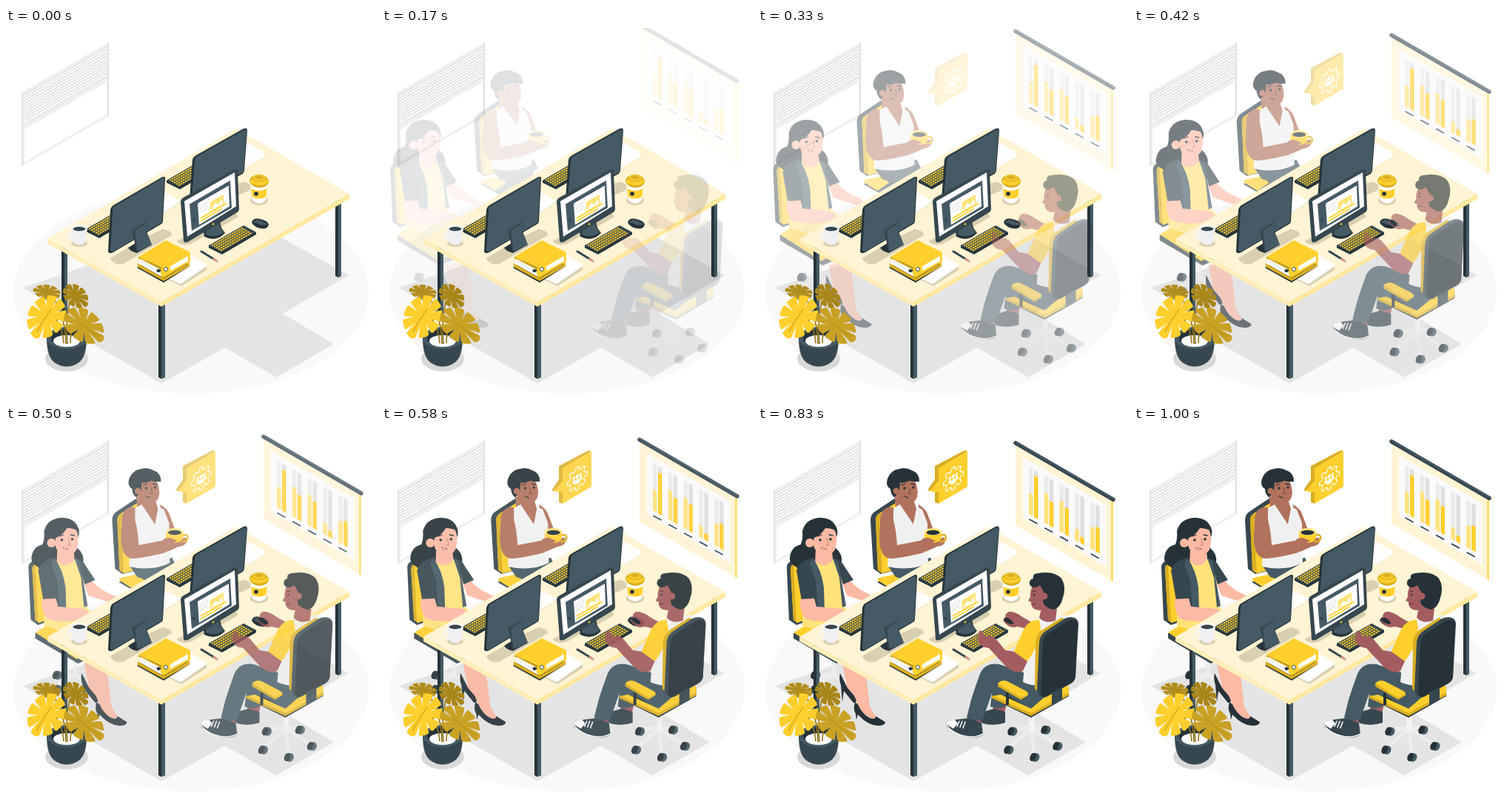
An HTML page for the animation above (1040 ms loop, 500 by 500 pixels).

```html
<!DOCTYPE html>
<html lang="en">
<head>
<meta charset="utf-8">
<title>Office team</title>
<style>
html, body { margin: 0; height: 100%; overflow: hidden; background: #fff }
svg { display: block; width: 100vw; height: 100vh; fill: none }
.y { fill: #ffcf2d } .yd { fill: #d9ae22 } .yl { fill: #ffe27a } .yp { fill: #fff4d4 }
.k { fill: #263238 } .d { fill: #37474f } .m { fill: #455a64 }
.w { fill: #fff } .g { fill: #f0f0f0 } .s { fill: #e4e4e4 } .t { fill: #d9cfb1 }
.a { fill: #b0725c } .b { fill: #fcb9a4 } .c { fill: #a35d60 }
.ln { stroke-linecap: round; stroke-linejoin: round }
</style>
</head>
<body>
<svg viewBox="0 0 500 500">
<defs>
  <g id="keyboard">
    <path class="k" d="M274 294L321 267L338 276V279L292 306L274 297Z"/>
    <path class="d" d="M274 294L321 267L338 276L291 303Z"/>
    <g id="keys"></g>
  </g>
  <g id="caster">
    <ellipse class="m" cx="2" cy="-1" rx="5" ry="6" transform="rotate(25)"/>
    <ellipse class="k" cx="-1.500" rx="4" ry="6" transform="rotate(25)"/>
  </g>
</defs>

<!-- floor and window -->
<ellipse cx="250" cy="356" rx="240" ry="138" fill="#f9f9f9"/>
<path class="s" d="M23 351L70 379L100 417L210 480L296 432L365 472L443 427L374 386L463 334L313 250Z"/>
<path class="g" d="M21 87L139 19V119L21 187Z"/>
<path d="M22 87V186M138 20V119" stroke="#dedede" stroke-width="1.500"/>
<path class="w" d="M25 89L136 25V64L25 128ZM25 137L136 73V117L25 181Z"/>
<g id="blinds"></g>
<path d="M25 130L136 66" stroke="#e6e6e6" stroke-width="2"/>

<!-- chart board -->
<g id="board">
  <path class="yp" d="M348 24L479 100V208L348 132Z"/>
  <path class="y" d="M477.500 99L479.500 100V208L477.500 207Z"/>
  <path fill="#fafafa" d="M358 40L471 105V188L358 122Z"/>
  <g id="bars"></g>
  <path class="ln" d="M348 21L480 97.500" stroke="#37474f" stroke-width="5.500"/>
  <path class="ln" d="M348 19.500L480 96" stroke="#455a64" stroke-width="2"/>
</g>

<!-- speech bubble -->
<g id="bubble">
  <path class="yd" d="M239 54L279 33L283 34L244 58V105L239 103V89L229 87L239 72Z"/>
  <path class="y" d="M244 57L283 34V82L244 105V90L232 88L244 74Z"/>
  <g transform="matrix(.866 -.5 0 1 264 71)">
    <path id="gear" stroke="#fff" stroke-width="1.300"/>
    <g class="w">
      <path d="M-4 7V3Q0-2 4 3V7ZM-8 4V1Q-5-2-3 1L-5 4ZM8 4V1Q5-2 3 1L5 4Z"/>
      <circle cy="-3" r="2.500"/><circle cx="-5" cy="-3" r="2"/><circle cx="5" cy="-3" r="2"/>
    </g>
  </g>
</g>

<!-- left team -->
<g id="left">
  <!-- coffee drinker -->
  <path class="d" d="M150 127Q150 119 157 115L181 99Q190 95 195 103L205 190L164 200L154 193Z"/>
  <path class="y" d="M157 127Q157 121 162 118L184 104Q192 101 195 108L202 190L166 199L160 195Z"/>
  <path class="yd" d="M157 127Q157 121 162 118L166 120Q162 124 162 130L166 199L160 195Z"/>
  <path class="d" d="M159 211L188 198L230 190V215L185 226Z"/>
  <path class="y" d="M159 208Q160 205 166 204L182 201Q190 205 194 209L178 220Z"/>
  <path class="m" d="M173 188L231 178L237 190L200 209L184 204Z"/>
  <path class="a" d="M215 106Q226 112 229 124L238 148L228 160L216 130Z"/>
  <path class="a" d="M183 96L206 92L212 112L207 138L184 116Z"/>
  <path class="g" d="M176 114Q184 109 190 106L208 133L213 109L220 113L227 131L228 185Q204 197 173 190Z"/>
  <path class="a" d="M181 110Q164 108 163 127L162 153Q163 178 177 179Q190 179 222 171L229 161L222 154L186 161Q185 142 181 127Z"/>
  <path class="a" d="M217 157Q222 148 230 152L245 152Q251 148 251 156Q249 162 240 163L224 170Z"/>
  <path d="M244 148Q253 145 252 152Q250 157 243 156" stroke="#d9ae22" stroke-width="2.500"/>
  <path class="y" d="M223 143V151Q226 158 235 158Q244 157 246 151V143Z"/>
  <ellipse class="yl" cx="234.500" cy="143" rx="11.500" ry="5"/>
  <ellipse class="k" cx="234.500" cy="144" rx="9" ry="3.200"/>
  <path class="a" d="M221 157Q222 150 228 151L238 155L229 161Z"/>
  <path class="a" d="M182 76Q195 66 210 74Q217 90 211 100Q204 107 193 102Q184 97 182 89Z"/>
  <path class="k" d="M183 97Q177 92 177 85Q169 80 174 69Q179 59 189 58Q198 55 206 60Q216 63 216 75Q209 76 203 74Q193 78 190 76L189 88Q187 82 183 84Q181 87 186 91Z"/>
  <circle class="a" cx="184.500" cy="88" r="4"/>
  <g class="ln" stroke="#263238" stroke-width="1.300"><path d="M192 80L197 78M205 78L210 79M196 95L201 97"/><path d="M203 84L204 91L201 91" stroke="#85503f"/></g>
  <circle class="k" cx="196" cy="84" r="1.700"/><circle class="k" cx="208" cy="83" r="1.700"/>

  <!-- woman in a jacket -->
  <path class="d" d="M37 193Q36 186 42 183L58 177L75 260L50 269L40 262Z"/>
  <path class="y" d="M42 194Q42 188 47 186L60 182L74 258L51 266L46 262Z"/>
  <path class="yd" d="M42 194Q42 188 46 187L50 265L46 262Z"/>
  <path d="M100 318V336L78 338M100 336L75 351M100 336L120 350" stroke="#ededed" stroke-width="5"/>
  <use href="#caster" x="75" y="337"/><use href="#caster" x="75" y="356"/>
  <path class="d" d="M46 280L73 270L140 305L104 321L46 287Z"/>
  <path class="y" d="M46 279L65 268L130 300L102 315Z"/>
  <path class="yl" d="M58 252L112 243L148 270L90 280L58 270Z"/>
  <path class="b" d="M112 320L119 356L127 371L132 367L127 345L129 320Z"/>
  <path class="k" d="M109 334Q107 342 110 350L112 373L114 358L127 374Q132 374 131 368L119 354L112 340Z"/>
  <path class="b" d="M117 318Q116 337 128 364L135 382Q148 398 159 396L149 379L145 345L141 318Z"/>
  <path class="k" d="M129 373Q126 382 130 389L131 397L133 390Q147 405 160 405Q170 405 170 400L157 392Q157 398 148 394Q138 388 133 376Z"/>
  <path class="k" d="M58 142Q62 126 80 124Q100 123 105 140Q106 146 104 150L102 164Q113 173 111 185Q90 194 70 189Q57 199 49 190Q37 185 43 170Q47 162 56 160Q59 152 58 142Z"/>
  <path class="b" d="M76 167L98 170L100 185L86 195L75 186Z"/>
  <path class="yl" d="M69 187L77 184Q88 194 100 180L108 186L116 245L64 260Z"/>
  <path class="b" d="M110 208L121 207Q132 222 157 231V242L118 229Z"/>
  <path class="d" d="M100 178Q111 181 115 190L127 208L113 214L108 198Z"/>
  <path class="m" d="M99 178L106 183L117 243L112 245L108 205Z"/>
  <path class="d" d="M72 178Q55 181 50 195L57 236L74 235L77 250L86 249L83 212Z"/>
  <path class="m" d="M72 178Q84 195 87 218L88 249L79 250L76 210L68 186Z"/>
  <path class="b" d="M55 234L74 233L77 244L112 247L125 256L105 263Q70 266 61 259Q54 249 55 234Z"/>
  <path class="b" d="M73 146Q83 132 101 139Q107 151 102 167Q96 177 86 174Q75 171 73 161Z"/>
  <path class="k" d="M71 163Q65 142 78 133Q92 127 104 142Q98 138 89 138Q82 149 74 151Z"/>
  <circle class="b" cx="68" cy="158" r="6"/>
  <g class="ln" stroke="#263238" stroke-width="1.300"><path d="M79 149L84 147M94 147L99 148"/><path d="M91 152L93 161L90 161" stroke="#d98b7b"/></g>
  <circle class="k" cx="82" cy="154" r="1.800"/><circle class="k" cx="96" cy="153" r="1.800"/>
  <path class="w" d="M83 164L91 166Q86 169 83 164Z" stroke="#9b4d4d" stroke-width=".8"/>
</g>

<!-- table -->
<g>
  <path class="k" d="M75 294H83V394L75 390ZM206 370H215V472L210 474L206 472ZM445 232H453V335L449 337L445 335Z"/>
  <path class="m" d="M79 294H83V394H79ZM210 370H215V472L210 474ZM449 232H453V335L449 337Z"/>
  <path class="yp" d="M56 285L311 136L464 224L210 370Z"/>
  <path d="M56 285L210 370V376.500L56 291Z" fill="#ffeeb8"/>
  <path d="M210 370L464 224V231L210 376.500Z" fill="#ffe8a0"/>
</g>

<!-- desk items -->
<path class="w" d="M319 151L349 168L323 184L300 172ZM205 217L236 234L210 251Z"/>
<path d="M349 168V174L323 189M236 235L211 252" stroke="#e5e0d0"/>
<path class="w" d="M349 169V174L323 189V184Z"/>
<use href="#keyboard" x="-57" y="-88"/>
<use href="#keyboard" x="-166" y="-22"/>
<path class="t" d="M300 212L322 208Q333 211 330 219L314 226L290 224Z"/>
<path class="k" d="M248 232L252 178Q253 174 257 172L321 136Q326 134 326 139L322 192Q322 196 318 198L254 232Q249 235 248 232Z"/>
<path class="m" d="M251 230L255 179Q255 175 259 173L321 138Q325 136 325 140L321 192Q321 195 317 197L255 230Z"/>
<path class="t" d="M141 311L192 281L211 272Q225 274 224 280L158 319Q145 321 141 311Z"/>
<path class="k" d="M138 302L141 246Q142 241 146 239L210 202Q216 199 215 205L212 261Q212 264 208 266L145 303Q139 306 138 302Z"/>
<path class="m" d="M141 302L144 246Q144 242 148 240L211 203Q214 202 214 206L211 260Q211 263 207 265L145 302Z"/>
<path class="k" d="M165 297L176 290L197 293L177 304Q168 302 165 297Z"/>
<path class="d" d="M170 273L189 262L190 275L197 293L177 303Z"/>
<path class="m" d="M174 274L189 264L190 275L197 293L178 301Z"/>

<path class="t" d="M231 288L300 247Q315 251 313 256L251 291Q236 296 231 288Z"/>
<path class="k" d="M267 274L289 262L291 270L296 277Q284 290 268 282Z"/>
<path class="m" d="M270 274L288 264L290 271L295 276Q282 285 270 279Z"/>
<path class="d" d="M236 235Q236 231 240 229L309 191Q313 190 313 194L315 244Q315 248 311 250L246 289Q240 291 240 287Z"/>
<path class="w" d="M241 234L309 195L311 241L245 282Z"/>
<path class="m" d="M248 238L303 206L305 243L251 274Z"/>
<path class="w" d="M259 237L301 213L302 241L261 266Z"/>
<path class="yl" d="M276 235L294 225V238L276 248Z"/>
<path class="w" d="M277 246L283 236L287 239L291 231L293 238Z"/>
<path d="M262 241L273 235M262 245L273 239M262 249L273 243" stroke="#dedede"/>
<path d="M263 257L298 237M263 261L292 244" stroke="#ffcf2d" stroke-width="2"/>
<circle class="k" cx="254" cy="260" r="1.500"/><circle class="y" cx="280" cy="265" r="1.300"/>

<use href="#keyboard"/>
<path class="k" d="M332 263Q334 256 343 258Q353 260 355 265Q354 272 346 271Q336 270 332 263Z"/>
<path class="m" d="M334 262Q338 257 344 260L354 265Q347 269 334 262Z"/>
<path class="ln" d="M264 302L282 313" stroke="#37474f" stroke-width="3"/>
<path class="ln" d="M281 312L285 315" stroke="#d99a8c" stroke-width="3"/>

<ellipse class="t" cx="99" cy="291" rx="11" ry="5"/>
<path d="M91 277Q84 275 85 282Q87 287 92 286" stroke="#f5f5f5" stroke-width="3"/>
<path class="g" d="M88 271L90 288Q93 293 99 293Q106 293 108 288L110 271Z"/>
<ellipse class="w" cx="99" cy="271" rx="11" ry="5"/><ellipse class="d" cx="99" cy="271.500" rx="8.500" ry="3"/>

<ellipse class="t" cx="342" cy="233" rx="12" ry="6.500"/>
<path class="w" d="M331 212L333 233Q342 241 351 233L353 212Z"/>
<path class="y" d="M331.500 217Q342 223 352.500 217L351.500 228Q342 233 332.500 228Z"/>
<circle class="k" cx="338" cy="224" r="2.800"/>
<path class="yd" d="M329 207Q329 202 333 201Q342 196 351 201Q355 203 355 208Q354 215 342 216Q331 215 329 207Z"/>
<ellipse class="y" cx="342" cy="207" rx="12" ry="5.500"/><ellipse class="yd" cx="342" cy="203" rx="10" ry="5"/><ellipse class="y" cx="342" cy="202.500" rx="8.500" ry="4"/><ellipse class="yd" cx="342" cy="202" rx="6" ry="2.500"/>

<path class="t" d="M215 338L237 349L272 326L268 321Z"/>
<path class="w" d="M214 336L246 304L272 321L236 346Z"/>
<path d="M214 337L236 347L272 322" stroke="#ded8c6"/>
<path class="k" d="M177 324L213 344L248 322L243 315L190 315Z"/>
<path class="yd" d="M178 318L213 338L248 317V322L213 342L178 323Z"/>
<path class="w" d="M182 314L210 330V336L182 320Z"/>
<path class="y" d="M179 309L216 287L249 303L212 325Z"/>
<path class="yd" d="M179 309L211 325V328L179 312Z"/>
<path class="w" d="M181 312L208 326V333L181 318Z"/>
<path d="M181 315L208 330" stroke="#dedede"/>
<path class="y" d="M210 325L249 303V316L212 338Q207 332 210 325Z"/>
<path class="w" d="M222 322L246 308V315L222 328Z"/>
<circle class="w" cx="216" cy="326" r="2.500" stroke="#37474f"/><circle class="k" cx="206" cy="328" r="2.300"/>

<!-- plant -->
<ellipse cx="82" cy="447" rx="29" ry="17" fill="#d8d8d8"/>
<path class="d" d="M55 419Q55 446 67 453Q82 462 97 453Q109 446 109 419Z"/>
<ellipse class="m" cx="82" cy="419" rx="27" ry="15"/><ellipse class="k" cx="82" cy="419" rx="21" ry="12"/><ellipse class="w" cx="82" cy="423" rx="18" ry="8"/>
<g id="plant"><path d="M81 427Q80 390 65 366M83 427Q80 390 87 368M78 426Q76 398 60 386M87 426Q87 405 98 397" stroke="#8f7219" stroke-width="1.600"/></g>

<!-- man at the front -->
<g id="right">
  <g id="base">
    <path class="ln" d="M372 406L347 412M372 406L391 410M372 409L342 434M372 409L375 444M372 409L404 430" stroke="#ededed" stroke-width="5"/>
    <path d="M372 388V412" stroke="#f4f4f4" stroke-width="7"/>
  </g>
  <path class="c" d="M370 275L352 271Q342 275 333 263L340 251Q351 251 359 258L375 267Z"/>
  <path class="k" d="M334 261Q337 257 346 261L347 268Q337 268 334 261Z"/>
  <path class="c" d="M336 256Q339 249 348 252L360 259L353 270L345 263Z"/>
  <path class="y" d="M330 358L380 335L422 352V363L371 391L318 366Z"/>
  <path class="c" d="M320 376L338 376L335 388L319 390Z"/>
  <path class="d" d="M286 388Q292 383 300 388L321 382L336 386V401Q321 406 306 402Z"/>
  <path class="m" d="M350 330Q322 328 320 344L316 379Q327 385 338 377L341 362L370 370Z"/>
  <path class="c" d="M287 390L304 391L303 403L285 402Z"/>
  <path class="m" d="M375 338L328 322Q309 319 302 335Q295 354 290 370L284 394Q294 402 306 396L318 361Q328 364 344 372L371 382L392 364Z"/>
  <path class="d" d="M256 403Q258 396 268 397L285 395L304 401L306 417Q299 423 282 420Q268 416 257 407Z"/>
  <path class="w" d="M256 403Q258 396 268 397L272 402L266 409Z"/>
  <path d="M256 404Q266 416 281 419Q296 422 306 416" stroke="#fff" stroke-width="1.500"/>
  <path class="ln" d="M271 406L274 399M275 407L278 399M279 408L282 400" stroke="#fff" stroke-width="1.500"/>
  <path class="k" d="M322 364L342 366L371 384L422 356V365L371 394L318 368Z"/>
  <path class="y" d="M318 365L330 363L371 382L422 354V362L371 390Z"/>
  <path class="yd" d="M318 364L371 388L422 360V364L371 392L318 368Z"/>
  <path class="g" d="M378 263Q401 253 420 256L416 340Q385 358 360 346L365 290Z"/>
  <path class="c" d="M387 237L406 247L404 263Q390 268 382 259Z"/>
  <path class="y" d="M382 262Q367 262 360 277L346 309L365 319Q378 303 385 280Z"/>
  <path class="c" d="M348 305L336 303L322 286L311 297L338 326Q351 336 360 331L366 318Z"/>
  <path class="c" d="M300 281Q300 275 304 277L309 284L319 284L325 291L313 300Q299 298 299 286Z"/>
  <path class="c" d="M373 216Q369 225 370 231L367 236L371 238Q371 249 383 249L398 244L400 220L388 211Z"/>
  <path class="k" d="M388 241Q386 231 389 226L383 215Q373 222 369 214Q368 207 374 206Q372 200 380 199Q402 195 412 206Q419 217 414 232Q411 245 402 248Q395 248 388 241Z"/>
  <circle class="c" cx="389" cy="230" r="4.500"/>
  <path class="ln" d="M373 224L377 223M372 241L377 240" stroke="#4f2c30"/><circle class="k" cx="375" cy="228" r="1.300"/>
  <path class="yd" d="M376 355L377 293Q378 281 387 275L412 259L418 262L386 365Z"/>
  <path class="d" d="M379 358L382 292Q383 282 391 277L415 261Q422 257 429 259Q435 261 435 268L431 338Q431 344 425 348L392 366Q383 369 379 358Z"/>
  <path class="k" d="M384 360L387 294Q387 285 395 280L420 264Q434 257 434 269L431 338Q431 343 425 347L392 365Q385 368 384 360Z"/>
  <path class="d" d="M399 360L413 353V370L399 378Z"/>
  <path d="M339 360V377" stroke="#263238" stroke-width="4"/>
  <path class="yd" d="M326 348L358 366L367 360V364L357 370L326 352Z"/>
  <path class="y" d="M326 348Q331 342 339 345L364 358Q369 361 364 364L357 367Z"/>
</g>
</svg>
<script>
const $ = id => document.getElementById(id);
const add = (id, d, attrs) => $(id).insertAdjacentHTML('beforeend', `<path d="${d}" ${attrs}/>`);

for (let i = 0; i < 10; i++)
  add('blinds', `M25 ${90 + i * 3.9}L136 ${26 + i * 3.9}`, 'stroke="#dfdfdf" stroke-width="1.6"');

for (let i = 0; i < 5; i++) {
  const x = 278 + i * 3, y = 294 + i * 1.7;
  add('keys', `M${x} ${y}L${x + 42} ${y - 24.2}`, 'stroke="#ffcf2d" stroke-width="2" stroke-dasharray="2.6 .9"');
}

// Yellow column heights, left and right in each pair
[[29, 56], [41, 34], [42, 37], [16, 9], [30, 34]].forEach((pair, i) => {
  pair.forEach((h, j) => {
    const x = 366 + i * 20.8 + j * 7, base = 117 + (x - 366) * .56;
    const column = height => `M${x} ${base}v${-height}l5.5 3.1v${height}Z`;
    add('bars', column(64), `fill="${j ? '#dfdfdf' : '#ebebeb'}"`);
    add('bars', column(h), `class="${j ? 'y' : 'yl'}"`);
  });
  add('bars', `M${366.5 + i * 20.8} ${124 + i * 11.7}l11 6`, 'stroke="#37474f" stroke-width="1.8"');
});

// Closed outline from a polar radius function
const polar = (n, radius) => 'M' + Array.from({ length: n }, (_, i) => {
  const a = i / n * Math.PI * 2, r = radius(a);
  return (r * Math.cos(a)).toFixed(2) + ' ' + (r * Math.sin(a)).toFixed(2);
}).join('L') + 'Z';

$('gear').setAttribute('d', polar(96, a => 13.5 + 2 * Math.tanh(4 * Math.cos(8 * a))));

// Round leaf with narrow slits and a slightly pointed tip
const leafShape = polar(240, a => {
  const slit = Math.max(0, -Math.cos(9 * a)) ** 9;
  const tip = Math.max(0, Math.cos(a)) ** 20;
  return (1 + .1 * tip) * (1 - .6 * slit);
});
const leaf = (x, y, rx, ry, angle, fill) => {
  const place = `transform="translate(${x} ${y}) rotate(${angle}) scale(${rx} ${ry})"`;
  add('plant', leafShape, `${place} fill="${fill}"`);
  add('plant', 'M-.4 0Q0 .08 .85 0', `${place} stroke="#a17f18" stroke-width=".025"`);
};
leaf(56, 357, 18, 10, 190, '#b28e1d');
leaf(94, 362, 19, 14, 40, '#a98619');
leaf(55, 390, 30, 25, 122, '#ffcf2d');
leaf(105, 402, 30, 21, 38, '#c9a125');

[[345, 413], [390, 411], [340, 438], [375, 448], [406, 433]].forEach(([x, y]) =>
  $('base').insertAdjacentHTML('beforeend', `<use href="#caster" x="${x}" y="${y}"/>`));

const bezier = (u, a, b) => 3 * u * (1 - u) ** 2 * a + 3 * u * u * (1 - u) * b + u ** 3;
function ease(t) {
  let lo = 0, hi = 1;
  for (let i = 0; i < 30; i++) {
    const mid = (lo + hi) / 2;
    if (bezier(mid, .36, .5) < t) lo = mid; else hi = mid;
  }
  return bezier(hi, -.01, 1.38);
}
const clamp = v => Math.min(1, Math.max(0, v));

function place(id, dx, dy, p) {
  $(id).setAttribute('transform', `translate(${dx * (1 - p)} ${dy * (1 - p)})`);
  $(id).setAttribute('opacity', clamp(p));
}

// The motion advances in 25 steps per loop
const start = performance.now();
function draw() {
  const step = Math.floor((performance.now() - start) % 1040 * .024 + .1);
  const t = (step + 1) / 25, p = step ? ease(t) : 0;
  place('left', -30, 0, p);
  place('right', 30, 0, p);
  place('board', 0, -30, p);
  $('bubble').setAttribute('opacity', clamp((t - .3) / .36));
  requestAnimationFrame(draw);
}
draw();
</script>
</body>
</html>
```
